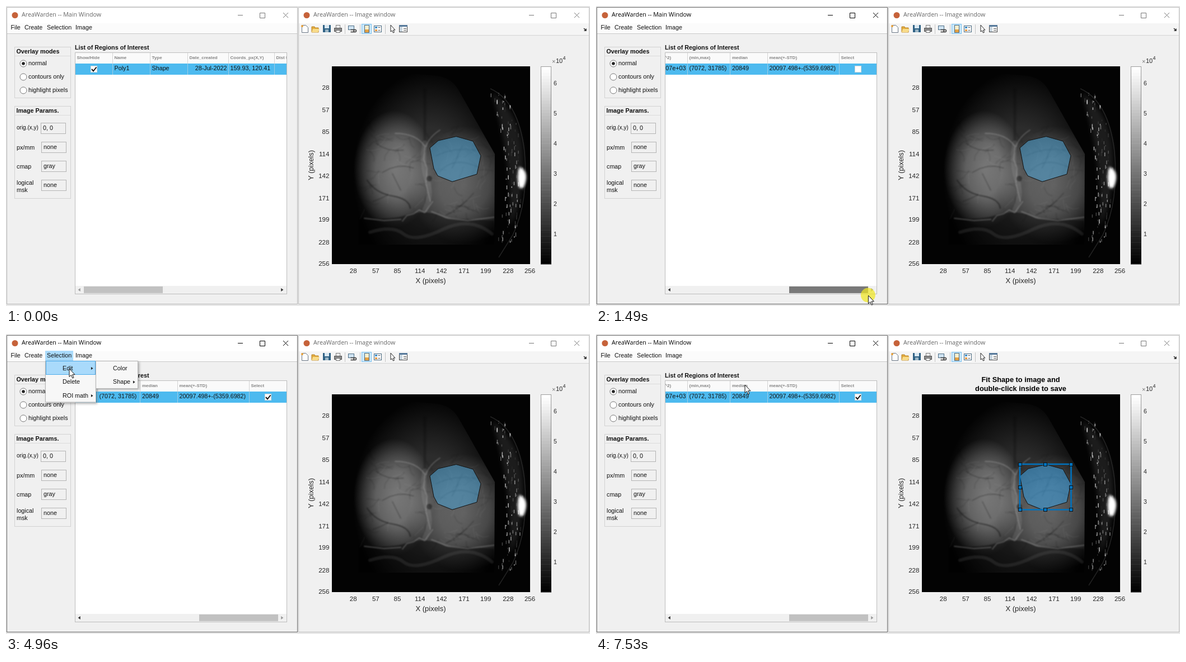
An HTML page with a canvas that plays this animation: 1043 by 537 pixels, repeating every 8000 ms.

```html
<!DOCTYPE html>
<html lang="en">
<head>
<meta charset="utf-8">
<title>Region editor demo</title>
<style>
  html, body { margin: 0; width: 100%; height: 100%; overflow: hidden; background: #f0f0f0; }
  canvas { display: block; }
</style>
</head>
<body>
<canvas id="stage" width="1043" height="537"></canvas>
<script>
const LOOP = 8000;
const APP = 'AreaWarden';
const SANS = '"Liberation Sans", Arial, sans-serif';
const UI = '"Open Sans", "Noto Sans", sans-serif';
const BLUE = '#0072bd';
const stage = document.getElementById('stage').getContext('2d');
let g = stage;

// ---------- drawing helpers ----------
function rect(x, y, w, h, fill, stroke) {
  if (fill) { g.fillStyle = fill; g.fillRect(x, y, w, h); }
  if (stroke) { g.strokeStyle = stroke; g.lineWidth = 1; g.strokeRect(x + .5, y + .5, w - 1, h - 1); }
}
function text(s, x, y, { size = 10.75, bold = false, color = '#111', align = 'left', font = SANS } = {}) {
  g.font = `${bold ? 'bold ' : ''}${size}px ${font}`;
  g.fillStyle = color;
  g.textAlign = align;
  g.textBaseline = 'middle';
  g.fillText(s, x, y);
}
function path(d, { fill, stroke, width = 1 } = {}) {
  const p = new Path2D(d);
  if (fill) { g.fillStyle = fill; g.fill(p); }
  if (stroke) { g.strokeStyle = stroke; g.lineWidth = width; g.stroke(p); }
}
function disc(x, y, r, fill, stroke) {
  g.beginPath();
  g.arc(x, y, r, 0, Math.PI * 2);
  if (fill) { g.fillStyle = fill; g.fill(); }
  if (stroke) { g.strokeStyle = stroke; g.lineWidth = 1; g.stroke(); }
}
function clipped(x, y, w, h, draw) {
  g.save();
  g.beginPath();
  g.rect(x, y, w, h);
  g.clip();
  draw();
  g.restore();
}
const triangle = (x, y, dir, color, s = 3) =>
  path(`M${x - dir * s * .6} ${y - s}L${x + dir * s * .8} ${y}L${x - dir * s * .6} ${y + s}Z`, { fill: color });

function layer(draw) {
  const c = document.createElement('canvas');
  c.width = 1043; c.height = 537;
  const before = g;
  g = c.getContext('2d');
  draw();
  g = before;
  return c;
}

// ---------- camera picture: soft tones only ----------
function glow(x, y, rx, ry, alpha) {
  g.save();
  g.translate(x, y);
  g.scale(rx, ry);
  const grad = g.createRadialGradient(0, 0, 0, 0, 0, 1);
  [[0, 1], [.45, .85], [.75, .4], [1, 0]].forEach(([at, k]) => grad.addColorStop(at, `rgba(255,255,255,${alpha * k})`));
  g.fillStyle = grad;
  g.fillRect(-1, -1, 2, 2);
  g.restore();
}

function drawPhoto() {
  let seed = 7;
  const random = () => (seed = seed * 16807 % 2147483647) / 2147483647;
  clipped(582, 108, 354, 354, () => {
    rect(582, 108, 354, 354, '#030303');
    g.save();
    g.clip(new Path2D('M582 108L770 125Q795 128 808 150L873 265L872 427L582 427Z'));
    glow(757, 300, 138, 185, .19);
    glow(693, 292, 72, 105, .36);
    glow(818, 320, 100, 105, .26);
    g.filter = 'blur(.8px)';
    g.lineCap = g.lineJoin = 'round';
    for (let i = 0; i < 90; i++) {
      let x = 640 + 225 * random(), y = 225 + 150 * random(), d = `M${x} ${y}`;
      let heading = random() * 7;
      for (let n = 0; n < 5; n++) {
        heading += random() - .5;
        d += `L${x += 5 * Math.cos(heading)} ${y += 4 * Math.sin(heading)}`;
      }
      path(d, { stroke: i % 3 ? 'rgba(0,0,0,.13)' : 'rgba(255,255,255,.06)', width: 1.5 });
    }
    const dark = 'rgba(15,15,15,.5)', pale = 'rgba(190,190,190,.32)';
    path('M645 312Q660 335 690 340T722 362', { stroke: dark, width: 2.2 });
    path('M660 245Q680 262 710 258M672 298Q700 280 728 290M690 300L705 330M655 350Q670 345 682 338', { stroke: dark });
    path('M768 268Q800 252 838 258M775 296Q800 268 842 288M797 290L815 250M785 375Q815 360 835 335', { stroke: dark });
    path('M748 150L748 245', { stroke: 'rgba(0,0,0,.2)', width: 5 });
    path('M748 245Q742 285 752 312T748 365', { stroke: 'rgba(185,185,185,.16)', width: 9 });
    path('M695 228Q732 228 747 250M775 222Q755 235 750 252M748 250L746 275L752 290L750 318L758 350', { stroke: pale, width: 1.8 });
    path('M630 380Q690 383 712 375Q755 362 785 380L872 384L872 427L630 427Z', { fill: 'rgba(0,0,0,.42)' });
    path('M708 385L716 375L728 372L738 365L748 370L762 350M640 380L675 384L705 382M760 368L790 380L825 384L872 378', { stroke: pale, width: 2 });
    path('M650 405Q690 392 710 408T780 400T868 408', { stroke: 'rgba(150,150,150,.14)', width: 6 });
    disc(756, 309, 5, 'rgba(20,20,20,.5)');
    g.restore();

    g.filter = 'blur(4px)';
    path('M868 155Q912 185 922 250Q930 340 900 395Q905 280 868 155Z', { fill: 'rgba(255,255,255,.1)' });
    g.filter = 'blur(.6px)';
    path('M865 148Q915 170 926 260Q934 350 905 410L880 450', { stroke: 'rgba(150,150,150,.22)', width: 1.5 });
    for (let i = 0; i < 150; i++) {
      const y = 155 + 270 * random();
      const edge = 893 + 31 * Math.sin((y - 145) / 320 * Math.PI);
      rect(edge - 32 * random(), y, 1.5, 2 + 6 * random(), `rgba(255,255,255,${.75 * random() ** 2})`);
    }
    g.filter = 'blur(2px)';
    path('M917 288Q930 293 929 309Q925 333 916 324Q911 305 917 288Z', { fill: '#fff' });
    g.filter = 'none';
  });
}

// ---------- windows ----------
function titleBar(x, width, title, active) {
  const ink = active ? '#000' : '#777';
  rect(x, 3, width, 28, '#fff');
  disc(x + 14, 16.5, 5.5, '#c6623a');
  text(`${APP} -- ${title}`, x + 26, 16.5, { size: 10.7, font: UI, color: active ? '#000' : '#666' });
  const r = x + width;
  path(`M${r - 107} 16.5h9M${r - 67.5} 12.5h9v9h-9ZM${r - 26} 12l9 9m0 -9l-9 9`, { stroke: ink });
}

function drawToolbar() {
  rect(524, 31, 517, 21, '#f5f5f5');
  rect(524, 52, 517, 1, '#d5d5d5');
  [605, 632, 677].forEach(x => rect(x, 33, 1, 17, '#c5c5c5'));
  path('M528.5 34.5h7l4 4v9h-11Z', { fill: '#fff', stroke: '#6b7785' });
  disc(529, 36, 2, '#e8a13a');
  path('M546 37h5l1 2h6v8h-12Z', { fill: '#e2ad3f', stroke: '#b98224' });
  path('M548 41h12l-3 6h-11Z', { fill: '#f8dc8b' });
  rect(566, 34, 14, 13, '#2f6184');
  rect(569, 34, 8, 6, '#d9e8f2');
  rect(570, 42, 6, 5, '#9bb6c6');
  rect(589, 34, 8, 6, '#fff', '#777');
  rect(586, 39, 14, 7, '#8b8b8b', '#555');
  rect(589, 43, 8, 5, '#eee', '#777');
  rect(611, 35, 11, 8, '#cfe3f1', '#4b6d86');
  path('M615.5 46.5h4a2 2 0 0 0 0 -4h-4M620.5 42.5h3a2 2 0 0 1 0 4h-3', { stroke: '#333', width: 1.4 });
  rect(635, 32, 18, 18, '#cde8fb', '#7cc2f0');
  rect(640, 34, 9, 14, '#f7efcf', '#47677e');
  rect(641, 42, 7, 5, '#e5a245');
  rect(657, 35, 14, 12, '#fff', '#47677e');
  rect(659, 37, 4, 3, '#3b8dc8');
  rect(659, 42, 4, 3, '#e5963b');
  path('M664.5 38.5h4M664.5 43.5h4', { stroke: '#555' });
  path('M687 34v12l2.5 -2 2 4 2 -1 -2 -4h3.5Z', { fill: '#fff', stroke: '#222' });
  rect(702, 34, 15, 13, '#fff', '#444');
  rect(702, 34, 15, 3, '#55789a');
  rect(703, 37, 5, 9, '#c9d6e0');
  path('M710 40.5h5M710 43.5h5', { stroke: '#555' });
  path('M1032 40l4 4m0 -3.5v3.5h-3.5', { stroke: '#222', width: 1.4 });
}

function drawAxes() {
  drawPhoto();
  const ink = { size: 11.6, color: '#262626' };
  for (const v of [28, 57, 85, 114, 142, 171, 199, 228, 256]) {
    const at = v * 1.383;
    text(v, 577.5, 108 + at, { ...ink, align: 'right' });
    text(v, 581.5 + at, 474.5, { ...ink, align: 'center' });
  }
  const label = { size: 13, color: '#262626', align: 'center' };
  text('X (pixels)', 758.5, 492, label);
  g.save();
  g.translate(545.5, 285);
  g.rotate(-Math.PI / 2);
  text('Y (pixels)', 0, 0, label);
  g.restore();
  const bands = 64, height = 354 / bands;
  for (let i = 0; i < bands; i++) {
    const tone = Math.round(255 * i / (bands - 1));
    rect(955, 462 - (i + 1) * height, 19, height + .5, `rgb(${tone},${tone},${tone})`);
  }
  rect(955, 108, 19, 354, null, 'rgba(60,60,60,.5)');
  for (let n = 1; n <= 6; n++) text(n, 978, 463.5 - n * 54.1, { size: 10.5, color: '#262626' });
  text('×', 975, 99.5, { size: 11, color: '#777' });
  text('10', 982, 99, { size: 11, color: '#262626' });
  text('4', 994.5, 93.5, { size: 9, color: '#262626' });
}

function panel(y, height, title) {
  rect(15, y, 101, height, null, '#d2d2d2');
  rect(16, y + 16, 99, 1, '#dcdcdc');
  text(title, 18.5, y + 9, { bold: true });
}

function drawMainWindow() {
  rect(2, 31, 519, 18, '#fbfbfb');
  rect(2, 49, 519, 1, '#c8c8c8');
  panel(73, 92, 'Overlay modes');
  ['normal', 'contours only', 'highlight pixels'].forEach((s, i) => {
    const y = 103 + 24 * i;
    disc(31, y, 6, '#fff', '#777');
    if (!i) disc(31, y, 2.8, '#222');
    text(s, 40, y + .5);
  });
  panel(179, 166, 'Image Params.');
  [['0, 0', 62, 209], ['none', 63, 243], ['gray', 63, 277], ['none', 63, 311]].forEach(([s, x, y]) => {
    rect(x, y, 45, 20, '#f0f0f0', '#b4b4b4');
    text(s, x + 4, y + 10.5);
  });
  text('orig.(x,y)', 19, 218.5, { size: 10 });
  text('px/mm', 19, 254);
  text('cmap', 19, 288);
  text('logical', 19, 317.5);
  text('msk', 19, 330);
  text('List of Regions of Interest', 123, 75, { bold: true });
}

const backdrop = layer(() => {
  rect(0, 0, 1043, 537, '#e8e8e8');
  rect(1, 2, 521, 532, '#f0f0f0');
  rect(522, 2, 520, 532, '#f0f0f0', '#bdbdbd');
  titleBar(523, 518, 'Image window', false);
  drawToolbar();
  drawAxes();
  drawMainWindow();
});

// ---------- table ----------
const COLUMNS = [
  ['Show/Hide', 123], ['Name', 190, 'Poly1'], ['Type', 257, 'Shape'],
  ['Date_created', 324, '28-Jul-2022', 'right'], ['Coords_px(X,Y)', 397, '159.93, 120.41'],
  ['Dist from orig.(px)', 479, '200.1900', 'right'], ['N_pixels_inside', 563, '2941', 'right'],
  ['Area(px^2)', 647, '2.9407e+03', 'right'], ['(min,max)', 721, '(7072, 31785)'],
  ['median', 797.5, '20849'], ['mean(+-STD)', 864, '20097.498+-(5359.6982)'], ['Select', 992]
];
const TABLE_END = 1059, THUMB_TRAVEL = 206, MAX_SCROLL = 558;

function checkbox(x, checked) {
  rect(x - 6, 107, 12, 12, '#fff', '#d8d8d8');
  if (checked) path(`M${x - 4} 113l3 3.5l5.5 -7`, { stroke: '#111', width: 2 });
}

function drawTable(thumb, dragging, selected) {
  rect(123, 83, 379, 433, '#fff', '#bdbdbd');
  clipped(124, 84, 377, 417, () => {
    rect(123, 84, 379, 19, '#fafafa');
    rect(123, 103, 379, 20, '#4dbaef');
    g.translate(Math.round(-thumb / THUMB_TRAVEL * MAX_SCROLL), 0);
    COLUMNS.forEach(([head, x, value, align = 'left'], i) => {
      const end = i + 1 < COLUMNS.length ? COLUMNS[i + 1][1] : TABLE_END;
      text(head, x + 3.5, 93, { size: 8, bold: true, color: '#858585' });
      rect(Math.floor(end), 84, 1, 19, '#d4d4d4');
      rect(Math.floor(end), 103, 1, 20, '#9fcde4');
      if (value) text(value, align === 'right' ? end - 2.5 : x + 3.5, 112.5, { align });
      else checkbox(Math.round((x + end) / 2), !i || selected);
    });
  });
  rect(124, 501, 377, 14, '#f0f0f0');
  triangle(131, 508, -1, thumb > 0 ? '#333' : '#999');
  triangle(493, 508, 1, thumb < THUMB_TRAVEL ? '#333' : '#999');
  rect(139 + Math.round(thumb), 502, 141, 12, dragging ? '#797979' : '#c1c1c1');
}

// ---------- menus ----------
function menu(x, y, w, textX, items, open, hovered) {
  const h = items.length * 24.5 + 1;
  g.save();
  g.shadowColor = 'rgba(0,0,0,.3)';
  g.shadowBlur = 4;
  g.shadowOffsetX = g.shadowOffsetY = 2;
  rect(x, y, w, h, '#f7f7f7');
  g.restore();
  rect(x, y, w, h, null, '#b5b5b5');
  items.forEach((item, i) => {
    const label = item.replace('>', ''), top = y + i * 24.5;
    if (i === open || i === hovered) rect(x + 1, Math.round(top), w - 2, 25, '#a9dafb', i === hovered ? '#4facea' : null);
    text(label, textX, top + 14);
    if (label !== item) triangle(x + w - 7.5, top + 13.5, 1, '#222', 2.6);
  });
}

function drawMenus(t, [x, y]) {
  const isOpen = t >= 4030 && t < 7050;
  if (isOpen) rect(70, 30, 50, 18, '#a9dafb');
  [['File', 8.5], ['Create', 33], ['Selection', 73], ['Image', 124]].forEach(([s, at]) => text(s, at, 39));
  if (!isOpen) return;
  const editOpen = t >= 4760, shapeOpen = t >= 5500;
  const inFirst = x < 160 && y > 49, inSecond = x >= 160 && x < 235;
  menu(70, 48, 91, 101, ['Edit>', 'Delete', 'ROI math>'], editOpen ? 0 : -1, inFirst ? 0 : -1);
  if (editOpen) menu(160, 48, 76, 191, ['Color', 'Shape>'], shapeOpen ? 1 : -1, inSecond ? (y < 73 ? 0 : 1) : -1);
  if (shapeOpen) menu(235, 72.5, 130, 267, ['Constrained edit', 'Unconstrained edit'], -1, x >= 235 ? 0 : -1);
}

// ---------- region ----------
function drawRegion(editing) {
  path('M757 254L772 241L804 233.5L834 242L848 268L841 301L797 314.5L771 304L764 291Z',
    { fill: editing ? 'rgba(60,158,220,.58)' : 'rgba(77,165,215,.53)', stroke: '#111' });
  if (!editing) return;
  path('M757 233H848.5V314.5H757Z', { stroke: BLUE, width: 2.6 });
  for (const x of [757, 802.5, 848.5])
    for (const y of [233, 274, 314.5])
      if (x !== 802.5 || y !== 274) rect(Math.round(x - 3.5), Math.round(y - 3.5), 7, 7, BLUE, '#111');
  const title = { size: 12.8, bold: true, color: '#000', align: 'center' };
  text('Fit Shape to image and', 758.5, 82, title);
  text('double-click inside to save', 758.5, 98.5, title);
}

// ---------- pointer ----------
const POINTER = [
  [0, 770, 556], [70, 768, 530], [800, 280, 508], [930, 280, 508], [1000, 321, 511], [1070, 364, 513],
  [1210, 424, 514], [1350, 468, 516], [1470, 486, 518], [1690, 490, 519], [1760, 490, 518], [2570, 473, 115],
  [3180, 473, 115], [3880, 97, 42], [4490, 97, 42], [4760, 113, 62], [4960, 113, 62], [5250, 172, 65],
  [5500, 195, 93], [5700, 195, 93], [5840, 199, 91], [6040, 199, 91], [6380, 266, 91], [LOOP, 266, 91]
];
const PRESSES = [[800, 1710], [2640, 2840], [2910, 2970], [4030, 4230], [6980, 7120]];

function pointerAt(t) {
  const i = Math.max(1, POINTER.findIndex(p => p[0] > t));
  const [t0, x0, y0] = POINTER[i - 1], [t1, x1, y1] = POINTER[i];
  let k = Math.max(0, (t - t0) / (t1 - t0));
  if (t1 - t0 > 250) k = k * k * (3 - 2 * k);
  return [x0 + (x1 - x0) * k, y0 + (y1 - y0) * k];
}

function drawPointer(t, [x, y]) {
  if (PRESSES.some(([from, to]) => t >= from && t < to)) disc(x - .5, y - .5, 13, 'rgba(240,230,35,.72)');
  g.save();
  g.translate(x, y);
  path('M0 0V14.5L3.5 11.5L5.8 17L8 16L5.7 10.7H10Z', { fill: '#fff', stroke: '#111' });
  g.restore();
}

function draw(t) {
  const pointer = pointerAt(t), active = t >= 930;
  const dragX = pointerAt(Math.min(t, 1690) - 12)[0] - 280;
  const thumb = t < 930 ? 0 : Math.max(0, Math.min(THUMB_TRAVEL, dragX));
  g.drawImage(backdrop, 0, 0);
  titleBar(2, 519, 'Main Window', active);
  rect(1, 2, 520, 532, null, active ? '#6a6a6a' : '#b8b8b8');
  drawTable(thumb, t >= 800 && t < 1760, t >= 2970);
  drawRegion(t >= 7530);
  drawMenus(t, pointer);
  drawPointer(t, pointer);
}

function tick() {
  draw(performance.now() % LOOP);
  requestAnimationFrame(tick);
}
tick();
</script>
</body>
</html>
```
